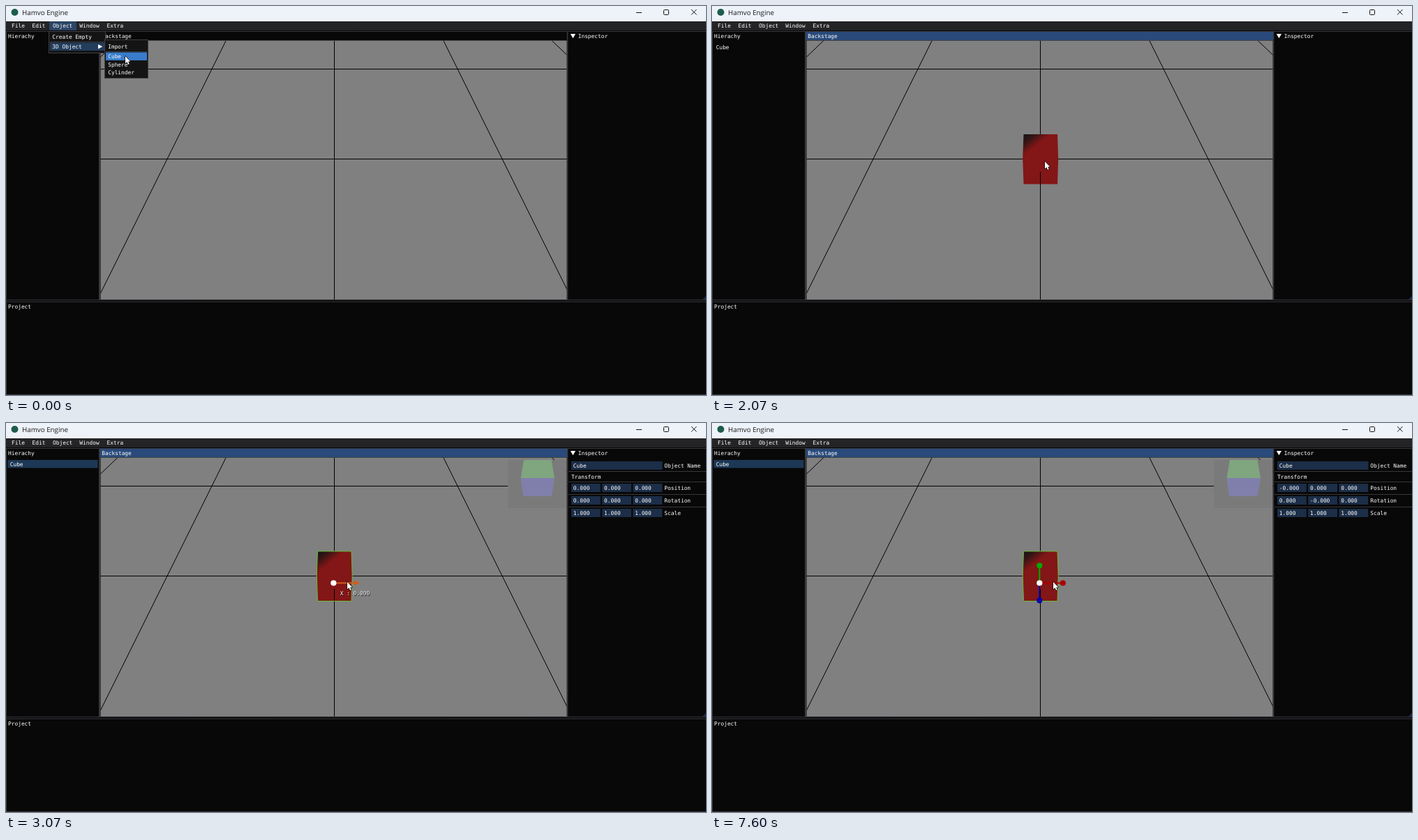
Animation, 1003 px wide and 558 px high, one loop 8000 ms. Source, as an HTML page with a canvas:

```html
<!DOCTYPE html>
<html lang="en">
<head>
<meta charset="utf-8">
<title>Hamvo Engine</title>
<style>
  html, body { margin: 0; width: 100%; height: 100%; overflow: hidden; background: #080808; }
  canvas { display: block; }
</style>
</head>
<body>
<canvas id="stage" width="1003" height="558"></canvas>
<script>
const ctx = document.getElementById('stage').getContext('2d');
const LOOP = 8000;
const MONO = '7.85px "DejaVu Sans Mono", monospace';
const BORDER = '#38383d';
const RED = '#aa0000', GREEN = '#00aa00', BLUE = '#0000aa', ACTIVE = '#d65c1c';
const ORIGIN = [469.3, 229.5];
const AXES = [[33.5, 0, RED], [0, -25, GREEN], [0, 25, BLUE]];

function box(x0, y0, x1, y1, fill) {
  ctx.fillStyle = fill;
  ctx.fillRect(x0, y0, x1 - x0, y1 - y0);
}

function frame(x0, y0, x1, y1, color) {
  ctx.strokeStyle = color;
  ctx.lineWidth = 1;
  ctx.strokeRect(x0 + 0.5, y0 + 0.5, x1 - x0 - 1, y1 - y0 - 1);
}

function line(x0, y0, x1, y1, color = '#000', width = 1) {
  ctx.strokeStyle = color;
  ctx.lineWidth = width;
  ctx.beginPath();
  ctx.moveTo(x0, y0);
  ctx.lineTo(x1, y1);
  ctx.stroke();
}

function path(points) {
  ctx.beginPath();
  points.forEach(([x, y]) => ctx.lineTo(x, y));
  ctx.closePath();
}

function poly(points, fill) {
  path(points);
  ctx.fillStyle = fill;
  ctx.fill();
}

function dot(x, y, r, fill) {
  ctx.beginPath();
  ctx.arc(x, y, r, 0, Math.PI * 2);
  ctx.fillStyle = fill;
  ctx.fill();
}

// y is the middle of the capital letters
function label(text, x, y, color = '#fff', font = MONO) {
  ctx.font = font;
  ctx.fillStyle = color;
  ctx.fillText(text, x, y + 2.9);
}

function drawTitleBar() {
  box(0, 0, 1003, 22, '#eef3fa');
  dot(12.5, 9, 5, '#1d5c4c');
  label('Hamvo Engine', 23, 9.6, '#1a1a1a', '9.8px "Open Sans", "Noto Sans", sans-serif');
  line(903, 9.5, 911, 9.5, '#111');
  ctx.beginPath();
  ctx.roundRect(942.5, 5.5, 7, 7, 1);
  ctx.stroke();
  line(982, 5, 989.5, 12.5, '#111');
  line(989.5, 5, 982, 12.5, '#111');
}

function drawMenuBar(open) {
  box(0, 22, 1003, 35, '#242426');
  if (open) box(62, 22, 101, 35, '#2b4566');
  label('File', 8, 28);
  label('Edit', 37.5, 28);
  label('Object', 67, 28);
  label('Window', 105.3, 28);
  label('Extra', 144.6, 28);
}

function drawPanels(created, selected) {
  box(0, 35, 1003, 558, '#080808');
  line(0, 36.5, 1003, 36.5, BORDER);
  line(0.5, 36, 0.5, 558, BORDER);
  line(134, 36, 134, 422, BORDER, 2);
  line(804.5, 36, 804.5, 422, BORDER, 1.5);
  line(0, 421.7, 1003, 421.7, BORDER);
  line(0, 424.3, 1003, 424.3, BORDER);
  line(0, 557.5, 1003, 557.5, BORDER);
  poly([[1003, 416], [1003, 421], [998, 421]], '#1a2c48');

  label('Hierachy', 3, 43);
  label('Project', 3, 431);
  poly([[808.8, 40], [816, 40], [812.4, 46.3]], '#fff');
  label('Inspector', 819.7, 43);

  if (created) box(135, 37, 804, 49, '#294a7a');
  label('Backstage', 137.3, 43);
  if (selected) box(2.5, 53, 131.5, 64.5, '#1d3856');
  if (created) label('Cube', 5.7, 59);
}

function drawGrid() {
  line(470.5, 50, 470.5, 421);
  line(135, 90.5, 804, 90.5);
  line(135, 219.5, 804, 219.5);
  line(315, 50, 135.5, 412);
  line(627, 50, 804, 407);
  line(160, 49.5, 135, 73.5);
  line(782.5, 50, 804, 70.5);
}

function drawCube(selected) {
  const shape = [[446.5, 184], [495, 184], [496.2, 219], [495, 255.5], [446.5, 255.5], [445.2, 219]];
  const shade = ctx.createLinearGradient(448, 186.5, 461, 203);
  shade.addColorStop(0, '#1e1515');
  shade.addColorStop(0.3, '#2e1515');
  shade.addColorStop(1, '#831616');
  poly(shape, shade);
  line(470.5, 238, 470.5, 256);
  if (selected) {
    path(shape);
    ctx.strokeStyle = '#66bb38';
    ctx.lineWidth = 1;
    ctx.stroke();
  }
}

function drawViewCube() {
  box(719, 53, 803, 122, '#7a7a7a');
  poly([[742, 53], [781.5, 53], [786, 79], [737.5, 79]], '#7fa67f');
  poly([[737.5, 79], [786, 79], [782, 105], [741, 105]], '#807fab');
}

function drawArrow(dx, dy, color) {
  const [ox, oy] = ORIGIN;
  const len = Math.hypot(dx, dy), ux = dx / len, uy = dy / len;
  const x = ox + dx, y = oy + dy, s = 4;
  line(ox + dx * 0.1, oy + dy * 0.1, x, y, color, 2);
  poly([[x + ux * s, y + uy * s],
        [x - ux * s - uy * s, y - uy * s + ux * s],
        [x - ux * s + uy * s, y - uy * s - ux * s]], color);
}

function drawPlane(dy, color) {
  const [ox, oy] = ORIGIN;
  const w = AXES[0][0];
  const x0 = ox + w * 0.5, x1 = ox + w * 0.8, y0 = oy + dy * 0.5, y1 = oy + dy * 0.8;
  const corners = [[x0, y0], [x1, y0], [x1, y1], [x0, y1]];
  ctx.globalAlpha = 0.38;
  poly(corners, color);
  ctx.globalAlpha = 1;
  path(corners);
  ctx.strokeStyle = color;
  ctx.lineWidth = 0.8;
  ctx.stroke();
}

const gizmos = {
  drag() {
    drawArrow(AXES[0][0], 0, ACTIVE);
    dot(...ORIGIN, 4.1, '#fff');
    label('X : 0.000', 479.4, 244.7, '#000');
    label('X : 0.000', 478.7, 244);
  },
  move() {
    AXES.forEach(axis => drawArrow(...axis));
    drawPlane(-25, BLUE);
    drawPlane(25, GREEN);
    dot(...ORIGIN, 4.1, '#fff');
  },
  rotate() {
    const [x, y] = ORIGIN;
    const arc = (color, rx, ry, from, to, width) => {
      ctx.beginPath();
      ctx.ellipse(x, y, rx, ry, 0, from, to);
      ctx.strokeStyle = color;
      ctx.lineWidth = width;
      ctx.stroke();
    };
    arc(BLUE, 39, 30, Math.PI, Math.PI * 2, 1.7);
    arc(GREEN, 39, 30, 0, Math.PI, 1.7);
    line(x, y - 39, x, y + 39, RED, 1.7);
    arc('#fff', 39.7, 39.7, 0, Math.PI * 2, 2.1);
  },
  scale() {
    const [x, y] = ORIGIN;
    for (const [dx, dy, color] of AXES) {
      line(x + dx * 0.1, y + dy * 0.1, x + dx, y + dy, color, 2);
      dot(x + dx, y + dy, 4.1, color);
    }
    dot(x, y, 4.1, '#fff');
  }
};

function drawInspector(settled) {
  const field = '#1c2e48';
  box(810, 55, 940.5, 67, field);
  label('Cube', 812.8, 61);
  label('Object Name', 943.3, 61);
  label('Transform', 810, 77);
  for (const y of [69.5, 84.5, 102.5, 120.5]) line(806, y, 1003, y, BORDER);

  const zero = settled ? '-0.000' : '0.000';
  const rows = [
    ['Position', zero, '0.000', '0.000'],
    ['Rotation', '0.000', zero, '0.000'],
    ['Scale', '1.000', '1.000', '1.000']
  ];
  rows.forEach(([name, ...values], row) => {
    const y = 93 + row * 18;
    values.forEach((value, col) => {
      const x = 810 + col * 44.2;
      box(x, y - 6, x + 41.8, y + 6, field);
      label(value, x + 2.8, y);
    });
    label(name, 943.3, y);
  });
}

function drawPopups() {
  box(61, 36, 143, 68, '#141414');
  frame(61, 36, 143, 68, '#3f3f44');
  label('Create Empty', 66.3, 44);
  line(63, 51.5, 141, 51.5, BORDER);
  box(63, 52.5, 141, 64, '#233d5c');
  label('3D Object', 66.3, 58);
  poly([[132, 55], [138.3, 58.3], [132, 61.5]], '#fff');

  box(141, 48, 204, 104, '#141414');
  frame(141, 48, 204, 104, '#3f3f44');
  line(143, 65.5, 202, 65.5, BORDER);
  box(143, 66.5, 202, 78, '#397ccc');
  label('Import', 146.2, 58.3);
  label('Cube', 146.2, 72.3);
  label('Sphere', 146.2, 84);
  label('Cylinder', 146.2, 95.5);
}

function cursorAt(t) {
  if (t < 1600) return [171, 72];
  if (t >= 2730) return [489, 228];
  if (t >= 2270) return [481, 228];
  if (t >= 2200) return [479, 226];
  // the pointer is sampled 15 times a second
  const u = Math.min(1, (Math.floor((t - 1600) * 0.015 + 0.1) + 1) / 8);
  const p = u * u * (3 - 2 * u);
  return [171 + 306 * p, 72 + 151 * p];
}

function drawCursor([x, y]) {
  const shape = [[0, 0], [0, 10.5], [2.4, 8.3], [4, 12], [5.7, 11.3], [4.2, 7.7], [7.2, 7.6]];
  path(shape.map(([dx, dy]) => [x + dx, y + dy]));
  ctx.lineJoin = 'round';
  ctx.strokeStyle = '#000';
  ctx.lineWidth = 1.2;
  ctx.stroke();
  ctx.fillStyle = '#fff';
  ctx.fill();
  ctx.lineJoin = 'miter';
}

function gizmoAt(t) {
  if (t < 3200) return 'drag';
  if (t < 5000) return 'move';
  return t < 7600 ? 'rotate' : 'scale';
}

function draw(t) {
  const created = t >= 1330, selected = t >= 3070;
  drawTitleBar();
  drawPanels(created, selected);
  drawMenuBar(!created);

  ctx.save();
  ctx.beginPath();
  ctx.rect(135.5, 49.5, 668, 371.5);
  ctx.clip();
  box(135, 49, 804, 422, '#808080');
  if (selected) drawViewCube();
  drawGrid();
  if (selected) drawViewCube();
  if (created) drawCube(selected);
  if (selected) gizmos[gizmoAt(t)]();
  ctx.restore();

  if (selected) drawInspector(t >= 3130);
  if (!created) drawPopups();
  drawCursor(cursorAt(t));
}

ctx.textRendering = 'geometricPrecision';
const start = performance.now();
function tick() {
  draw((performance.now() - start) % LOOP);
  requestAnimationFrame(tick);
}
tick();
</script>
</body>
</html>
```
